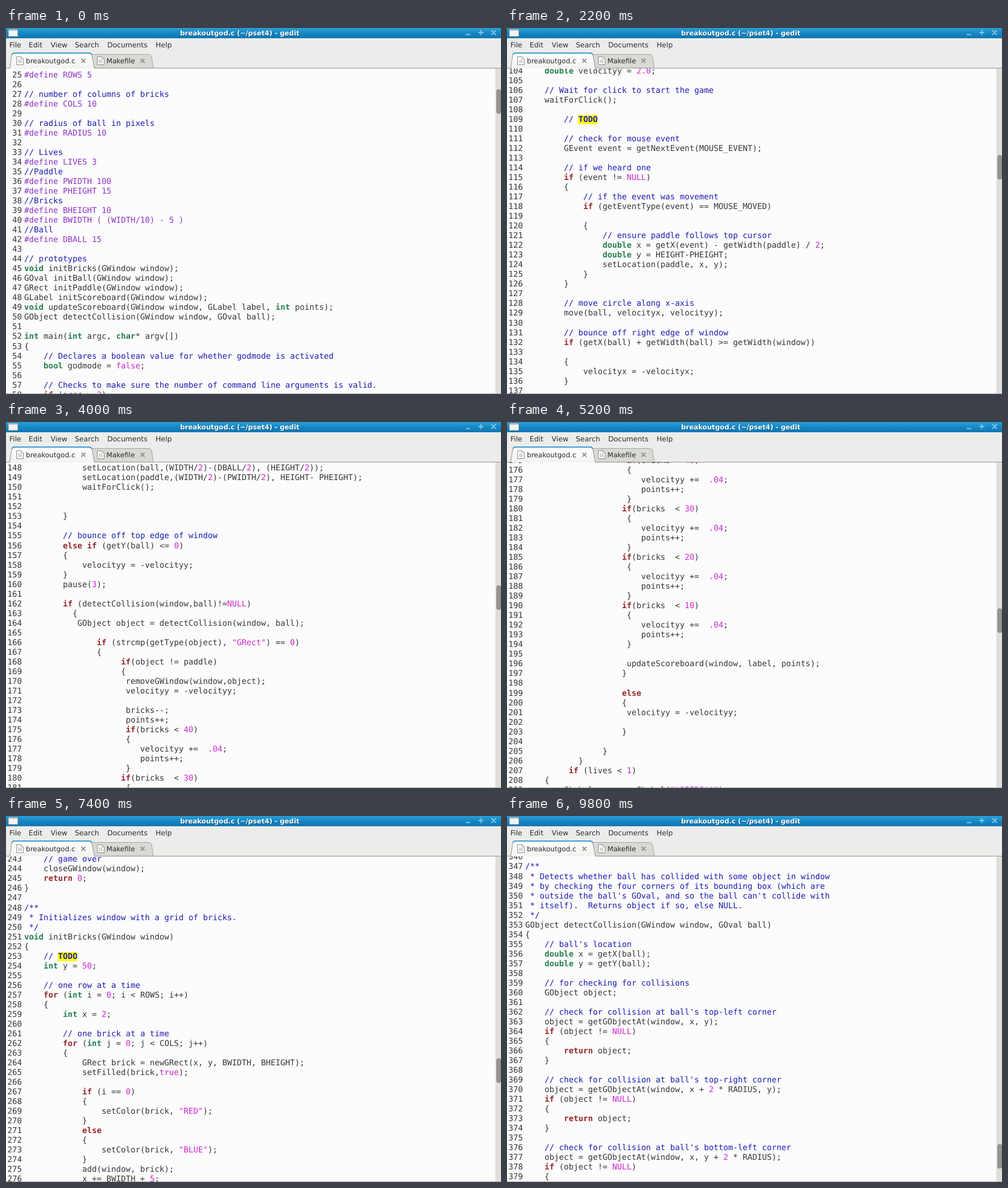
An HTML page that plays this animation: 870x643 px, repeating every 10 s.

```html
<!DOCTYPE html>
<html lang="en">
<head>
<meta charset="utf-8">
<title>Scrolling through code</title>
<style>
  html, body { margin: 0; width: 870px; height: 643px; overflow: hidden; background: #fcfcfc; }
  body { position: relative; text-rendering: geometricPrecision; }
  svg { position: absolute; left: 0; top: 0; font: 12.4px "DejaVu Sans", sans-serif; }
  #view { position: absolute; left: 0; top: 71px; width: 860px; height: 571px; overflow: hidden; }
  #code { position: absolute; left: 0; margin: 0; color: #363636;
          font: 14.12px/17.03125px "DejaVu Sans Mono", monospace; }
  #code div { height: 17.03125px; white-space: pre; }
  .num { display: inline-block; width: 28px; margin-right: 4px; text-align: right; }
  .comment { color: #1c1cb4; }
  .macro { color: #8c35c4; }
  .type { color: #26804f; font-weight: bold; }
  .key { color: #96262a; font-weight: bold; }
  .value { color: #cf25cf; }
  .escape { color: #6a5acd; }
  .todo { background: #ff0; font-weight: bold; }
  .current { font-weight: bold; }
</style>
</head>
<body>
<div id="view"><pre id="code"></pre></div>
<svg width="870" height="643">
  <defs>
    <linearGradient id="bar" x2="0" y2="1">
      <stop stop-color="#2c9fd6"/><stop offset=".5" stop-color="#1587c4"/><stop offset="1" stop-color="#0f76b0"/>
    </linearGradient>
    <linearGradient id="tab" x2="0" y2="1">
      <stop stop-color="#fff"/><stop offset="1" stop-color="#f2f2f0"/>
    </linearGradient>
    <g id="page">
      <path d="M.5 .5h8l4 4v10h-12z" fill="#fafafa" stroke="#8b8b88"/>
      <path d="M8.500 .5v4h4M3 6.500h6M3 8.500h7M3 10.500h7" fill="none" stroke="#b4b4b0"/>
    </g>
    <path id="close" d="M-3.500-3.500l7 7m0-7l-7 7" stroke="#96968f" stroke-width="2"/>
  </defs>
  <rect width="870" height="71" fill="#ececea"/>
  <rect width="870" height="18" fill="url(#bar)"/>
  <rect x="4" y="2" width="17" height="13" rx="1" fill="#f4f4f2" stroke="#5d7482"/>
  <path d="M5 4h15" stroke="#b9c6cc" stroke-width="2"/>
  <g font-size="11.75" font-weight="bold">
    <text x="307" y="13.500" fill="#0b5885">breakoutgod.c (~/pset4) - gedit</text>
    <text x="306" y="12.500" fill="#fff">breakoutgod.c (~/pset4) - gedit</text>
  </g>
  <path d="M808 11.500h8M830 8h9M834.500 3.500v9M853 4l8 8m0-8l-8 8" stroke="#84c6e8" stroke-width="2"/>
  <g fill="#2c2c2c">
    <text x="6" y="33.500">File</text>
    <text x="39.800" y="33.500">Edit</text>
    <text x="78.500" y="33.500">View</text>
    <text x="121" y="33.500">Search</text>
    <text x="178" y="33.500">Documents</text>
    <text x="263" y="33.500">Help</text>
  </g>
  <path d="M150 70.500V46.500H251Q255 46.500 256 51L259 70.500" fill="#d9d9d5" stroke="#a3a39f"/>
  <path d="M0 70.500H870" stroke="#8f8f8b"/>
  <path d="M6.500 71L10 48Q11 43.500 15 43.500H146Q150 43.500 151 48L155.500 71" fill="url(#tab)" stroke="#8f8f8b"/>
  <path d="M10.500 47Q11.500 44 15 44H146Q149.500 44 150.500 47" fill="none" stroke="#3c9bd0" stroke-width="2"/>
  <use href="#page" x="18" y="50"/>
  <use href="#page" x="160" y="50"/>
  <use href="#close" x="136" y="57.500"/>
  <use href="#close" x="240" y="57.500"/>
  <g font-size="12.05" fill="#2c2c2c">
    <text x="35" y="61.500">breakoutgod.c</text>
    <text x="176.500" y="61.500">Makefile</text>
  </g>
  <rect x="860" y="71" width="10" height="572" fill="#dfdeda"/>
  <rect id="thumb" x="862.500" width="7" height="42" rx="3" fill="#969692" stroke="#7d7d79"/>
  <path d="M0 642.500H870" stroke="#a5a5a1"/>
</svg>
<script>
const FIRST_LINE = 24, CURRENT_LINE = 305;
const source = String.raw`// number of rows of bricks
#define ROWS 5

// number of columns of bricks
#define COLS 10

// radius of ball in pixels
#define RADIUS 10

// Lives
#define LIVES 3
//Paddle
#define PWIDTH 100
#define PHEIGHT 15
//Bricks
#define BHEIGHT 10
#define BWIDTH ( (WIDTH/10) - 5 )
//Ball
#define DBALL 15

// prototypes
void initBricks(GWindow window);
GOval initBall(GWindow window);
GRect initPaddle(GWindow window);
GLabel initScoreboard(GWindow window);
void updateScoreboard(GWindow window, GLabel label, int points);
GObject detectCollision(GWindow window, GOval ball);

int main(int argc, char* argv[])
{
    // Declares a boolean value for whether godmode is activated
    bool godmode = false;

    // Checks to make sure the number of command line arguments is valid.
    if (argc > 2)
    {
        printf("Usage: ./breakout [GOD]\n");
        return 1;
    }
    // Checks whether godmode was requested
    if (argc == 2 && strcmp(argv[1], "GOD") == 0)
    {
        godmode = true;
    }

    // seed pseudorandom number generator
    srand48(time(NULL));

    // instantiate window
    GWindow window = newGWindow(WIDTH, HEIGHT);

    setColor(window,"BLACK");
    setFilled(window,true);

    // instantiate bricks
    initBricks(window);

    // instantiate ball, centered in middle of window
    GOval ball = initBall(window);

    // instantiate paddle, centered at bottom of window
    GRect paddle = initPaddle(window);

    // instantiate scoreboard, centered in middle of window, just above ball
    GLabel label = initScoreboard(window);

    // number of bricks initially
    int bricks = COLS * ROWS;

    // number of lives initially
    int lives = LIVES;

    // number of points initially
    int points = 0;

    // keep playing until game over
    while (lives > 0 && bricks > 0)
    {
         // initial velocity
    double velocityx = drand48();
    double velocityy = 2.0;

    // Wait for click to start the game
    waitForClick();

        // TODO

        // check for mouse event
        GEvent event = getNextEvent(MOUSE_EVENT);

        // if we heard one
        if (event != NULL)
        {
            // if the event was movement
            if (getEventType(event) == MOUSE_MOVED)

            {
                // ensure paddle follows top cursor
                double x = getX(event) - getWidth(paddle) / 2;
                double y = HEIGHT-PHEIGHT;
                setLocation(paddle, x, y);
            }
        }

        // move circle along x-axis
        move(ball, velocityx, velocityy);

        // bounce off right edge of window
        if (getX(ball) + getWidth(ball) >= getWidth(window))

        {
            velocityx = -velocityx;
        }

        // bounce off left edge of window
        else if (getX(ball) <= 0)
        {
            velocityx = -velocityx;
        }
        // reset and loose if bottom edge of window
        else if (getY(ball) + getWidth(ball) >= getHeight(window))

        {
            lives--;
            setLocation(ball,(WIDTH/2)-(DBALL/2), (HEIGHT/2));
            setLocation(paddle,(WIDTH/2)-(PWIDTH/2), HEIGHT- PHEIGHT);
            waitForClick();


        }

        // bounce off top edge of window
        else if (getY(ball) <= 0)
        {
            velocityy = -velocityy;
        }
        pause(3);

        if (detectCollision(window,ball)!=NULL)
          {
           GObject object = detectCollision(window, ball);

               if (strcmp(getType(object), "GRect") == 0)
               {
                    if(object != paddle)
                    {
                     removeGWindow(window,object);
                     velocityy = -velocityy;

                     bricks--;
                     points++;
                     if(bricks < 40)
                     {
                        velocityy +=  .04;
                        points++;
                     }
                    if(bricks  < 30)
                     {
                        velocityy +=  .04;
                        points++;
                     }
                    if(bricks  < 20)
                     {
                        velocityy +=  .04;
                        points++;
                     }
                    if(bricks  < 10)
                     {
                        velocityy +=  .04;
                        points++;
                     }

                     updateScoreboard(window, label, points);
                    }

                    else
                    {
                     velocityy = -velocityy;

                    }

                }
           }
         if (lives < 1)
    {
        GLabel go = newGLabel("LOSERS!!");
        setFont(go, "Serif-70");
        setColor(go, "RED");
        add(window, go);
        setLocation(go,( WIDTH/2)- (getWidth(go)/2), 300);
        pause(400);
        closeGWindow(window);
        printf("Yo Final Skoh Was %d \n", points);
        return 0;

    }

 if (bricks < 1)
    {
        GLabel yw = newGLabel(" PIMP!!");
        setFont(yw, "Serif-70");
        setColor(yw, "GREEN");
        add(window, yw);
       setLocation(yw,( WIDTH/2)- (getWidth(yw)/2), 400);
        pause(400);
        closeGWindow(window);
        printf("Yo Final Skoh Was %d Grats M0ther Fucker! \n", points);
        return 0;

    }
   if (godmode == true)
   {
    setLocation(paddle,getX(ball)-(PWIDTH/2),HEIGHT-PHEIGHT);
   }
    }

    // wait for click before exiting
    waitForClick();

    // game over
    closeGWindow(window);
    return 0;
}

/**
 * Initializes window with a grid of bricks.
 */
void initBricks(GWindow window)
{
    // TODO
    int y = 50;

    // one row at a time
    for (int i = 0; i < ROWS; i++)
    {
        int x = 2;

        // one brick at a time
        for (int j = 0; j < COLS; j++)
        {
            GRect brick = newGRect(x, y, BWIDTH, BHEIGHT);
            setFilled(brick,true);

            if (i == 0)
            {
                setColor(brick, "RED");
            }
            else
            {
                setColor(brick, "BLUE");
            }
            add(window, brick);
            x += BWIDTH + 5;
        }
        y += BHEIGHT + 5;
    }
}

/**
 * Instantiates ball in center of window.  Returns ball.
 */
GOval initBall(GWindow window)
{
    // TODO
    double x = (WIDTH/2)-(DBALL/2);
    double y = (HEIGHT/2);

    GOval ball = newGOval(x, y, DBALL, DBALL);
    setColor(ball, "WHITE");
    setFilled(ball,true);
    add(window, ball);
    return ball;
 }

/**
 * Instantiates paddle in bottom-middle of window.
 */
GRect initPaddle(GWindow window)
{
    // TODO
    GRect paddle = newGRect((WIDTH/2)-(PWIDTH/2), HEIGHT- PHEIGHT, PWIDTH, PHEIGHT);
    setColor(paddle, "#b3c3ff");
    setFilled(paddle,true);
    add(window, paddle);
    return paddle;



}

/**
 * Instantiates, configures, and returns label for scoreboard.
 */
GLabel initScoreboard(GWindow window)
{

    GLabel label = newGLabel("0");
    setFont (label, "Georgia-40");
    double x = (getWidth(window) - getWidth(label)) / 2;
    double y = (getHeight(window) - getHeight(label)) / 2;
    setLocation(label,x,y);
    add(window, label);
    setColor(label,"#80666699");
    return label;
}

/**
 * Updates scoreboard's label, keeping it centered in window.
 */
void updateScoreboard(GWindow window, GLabel label, int points)
{
    // update label
    char s[12];
    sprintf(s, "%i", points);
    setLabel(label, s);

    // center label in window
    double x = (getWidth(window) - getWidth(label)) / 2;
    double y = (getHeight(window) - getHeight(label)) / 2;
    setLocation(label, x, y);
}


/**
 * Detects whether ball has collided with some object in window
 * by checking the four corners of its bounding box (which are
 * outside the ball's GOval, and so the ball can't collide with
 * itself).  Returns object if so, else NULL.
 */
GObject detectCollision(GWindow window, GOval ball)
{
    // ball's location
    double x = getX(ball);
    double y = getY(ball);

    // for checking for collisions
    GObject object;

    // check for collision at ball's top-left corner
    object = getGObjectAt(window, x, y);
    if (object != NULL)
    {
        return object;
    }

    // check for collision at ball's top-right corner
    object = getGObjectAt(window, x + 2 * RADIUS, y);
    if (object != NULL)
    {
        return object;
    }

    // check for collision at ball's bottom-left corner
    object = getGObjectAt(window, x, y + 2 * RADIUS);
    if (object != NULL)
    {
`;

const span = (name, text) => `<span class="${name}">${text}</span>`;
const escapeHtml = text => text.replace(/&/g, "&amp;").replace(/</g, "&lt;").replace(/>/g, "&gt;");

const token = new RegExp([
  /(?<comment>\/\/.*|^\/\*\*.*|^ \*.*)/, /(?<macro>^#.*)/, /(?<string>"[^"]*")/,
  /(?<type>\b(?:void|int|char|bool|double)\b)/,
  /(?<key>\b(?:if|else|while|for|return)\b)/,
  /(?<value>\b(?:true|false|NULL)\b|\.?\b\d+(?:\.\d+)?)/
].map(part => part.source).join("|"), "g");

function highlight(line) {
  return escapeHtml(line).replace(token, (text, ...rest) => {
    const groups = rest.at(-1);
    if (groups.string) return span("value", text.replace(/%[di]|\\n/g, m => span("escape", m)));
    if (groups.comment) return span("comment", text.replace("TODO", span("todo", "TODO")));
    return span(Object.keys(groups).find(name => groups[name]), text);
  });
}

const code = document.getElementById("code");
const thumb = document.getElementById("thumb");
code.innerHTML = source.split("\n").map((line, i) => {
  const number = i + FIRST_LINE;
  return `<div>${span(number === CURRENT_LINE ? "num current" : "num", number)}${highlight(line)}</div>`;
}).join("");

// Mouse wheel notches turned in each 200 ms step of the loop
const notches = [..."00004542211112111121111121111211111233202333000454"].map(Number);
const STEP = 200, NOTCH = 67.62;
let total = 0;
const offsets = notches.map(n => (total += n) * NOTCH);

function draw(now) {
  const offset = offsets[Math.floor(now / STEP) % offsets.length];
  code.style.top = -13.4 - offset + "px";
  thumb.setAttribute("y", 108 + offset * 0.0856);
  requestAnimationFrame(draw);
}
draw(0);
</script>
</body>
</html>
```
